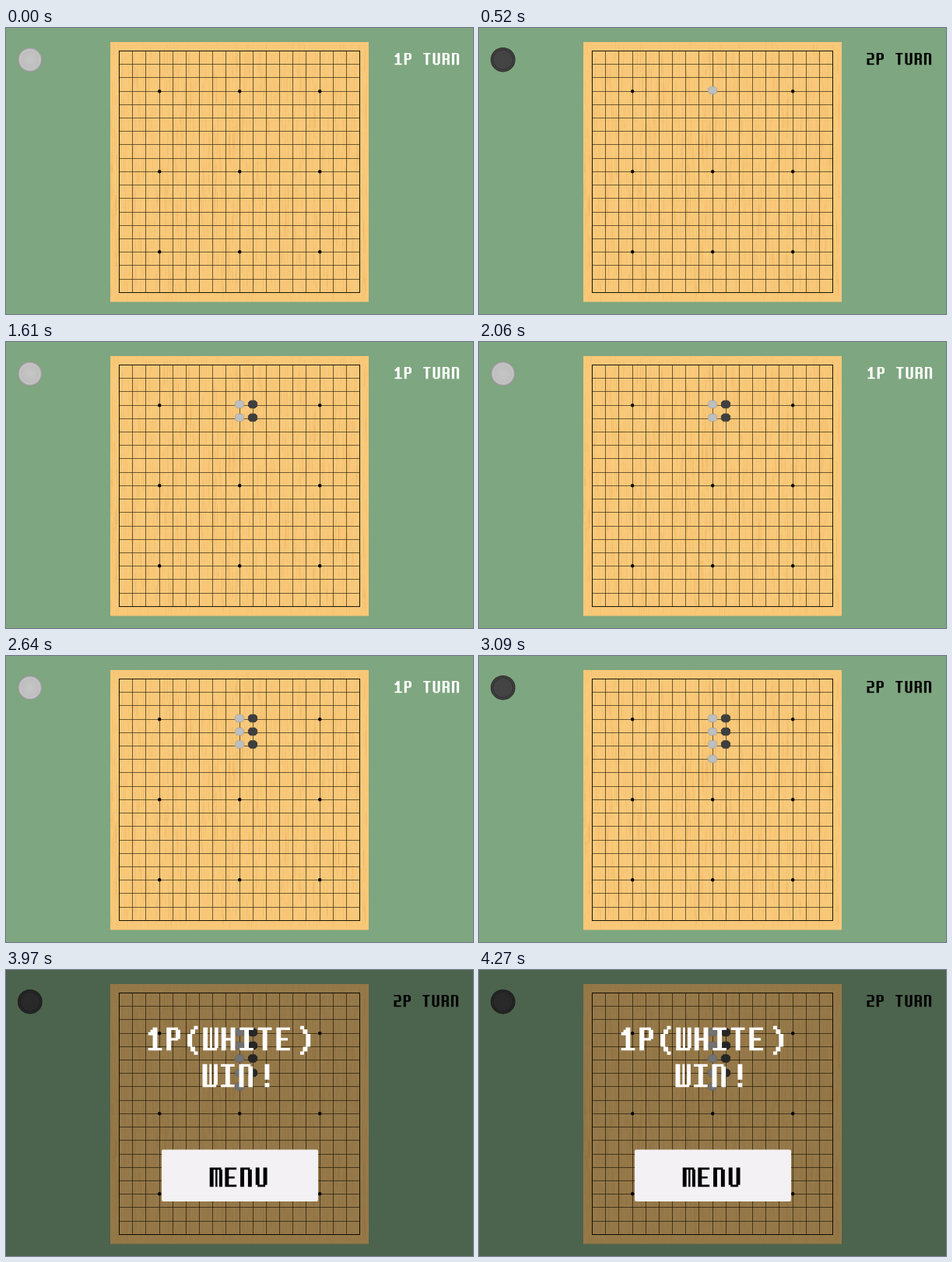
Recreate the animation shown at these times as an HTML page. Size 600x367 px, loop 4510 ms.

```html
<!DOCTYPE html>
<html lang="en">
<head>
<meta charset="utf-8">
<title>Five in a row</title>
<style>
  html, body { margin: 0; width: 100%; height: 100%; overflow: hidden; background: #7ea680; }
  svg { display: block; width: 100vw; height: 100vh; }
</style>
</head>
<body>
<svg id="stage" viewBox="0 0 600 367" xmlns="http://www.w3.org/2000/svg">
  <defs>
    <radialGradient id="pale">
      <stop offset="0" stop-color="#c6c6c6"/>
      <stop offset=".76" stop-color="#bebebe"/>
      <stop offset=".82" stop-color="#cacaca"/>
      <stop offset=".92" stop-color="#a6a6a6"/>
      <stop offset="1" stop-color="#8f8f8f"/>
    </radialGradient>
    <radialGradient id="dark">
      <stop offset="0" stop-color="#454545"/>
      <stop offset=".74" stop-color="#434343"/>
      <stop offset=".8" stop-color="#303030"/>
      <stop offset=".88" stop-color="#444"/>
      <stop offset="1" stop-color="#242424"/>
    </radialGradient>
  </defs>
  <rect width="600" height="367" fill="#7ea680"/>
  <g id="board"></g>
  <g id="stones"></g>
  <g id="turn1"></g>
  <g id="turn2"></g>
  <g id="result"></g>
</svg>
<script>
const LOOP = 4510, WIN = 3970;
const WHITE_AT = [420, 1210, 2090, 2880, WIN];
const BLACK_AT = [760, 1610, 2400, 3150];
const ROWS = [80, 97, 113.5, 132, 149.5];

const $ = id => document.getElementById(id);

function add(parent, tag, attrs) {
  const el = document.createElementNS("http://www.w3.org/2000/svg", tag);
  for (const k in attrs) el.setAttribute(k, attrs[k]);
  parent.appendChild(el);
  return el;
}

// Blocky lettering on an 8-unit cell: bars shared between letters
const BARS = {
  l: "M0 0h2v10h-2z", r: "M4 0h2v10h-2z", s: "M4 1h2v9h-2z",
  t: "M0 0h6v1.1h-6z", o: "M0 0h5v1.1h-5z",
  m: "M0 4.6h5v1.1h-5z", b: "M0 8.9h6v1.1h-6z", u: "M1 8.9h4v1.1h-4z",
  c: "M2 0h2v10h-2z", n: "M3 0h1v10h-1z",
  h: "M4 1h2v4h-2z", k: "M4 5.6h2v4.4h-2z", j: "M0 5.4h2v4h-2z",
  v: "M4 0h2v9h-2z", w: "M0 0h2v9h-2z",
  x: "M5 0h1.6v9h-1.6z", y: "M5 1h1.6v9h-1.6z",
  f: "M0 2h2v1.4h-2zM1 1h2v1.4h-2z",
  "(": "M4 -.7h1.7v1.5h-1.7zM2.5 .8h2v2h-2zM1.2 2.8h2v5.6h-2zM2.5 8.4h2v2h-2zM4 10.4h1.7v1.5h-1.7z",
  ")": "M2.4 -.7h1.7v1.5h-1.7zM3.6 .8h2v2h-2zM4.9 2.8h2v5.6h-2zM3.6 8.4h2v2h-2zM2.4 10.4h1.7v1.5h-1.7z",
  "!": "M3.2 0h2v6.8h-2zM3.2 8.2h2v1.8h-2z"
};
const LETTERS = {
  "1": "cbf", "2": "ohmjb", P: "lohm", T: "tc", U: "wvu", R: "lohmk", N: "los",
  W: "wnxb", H: "lrm", I: "tcb", E: "ltmb", M: "otlny",
  "(": "(", ")": ")", "!": "!", " ": ""
};

function write(parent, text, x, y, unit, fill) {
  const g = add(parent, "g", {
    transform: `translate(${x} ${y}) scale(${unit})`, fill, role: "img", "aria-label": text
  });
  [...text].forEach((ch, i) => {
    const d = [...LETTERS[ch]].map(b => BARS[b]).join("");
    if (d) add(g, "path", { d, transform: `translate(${i * 8} 0)` });
  });
}

function random(seed) {
  return () => (seed = (seed * 16807) % 2147483647) / 2147483647;
}

// Grid lines sit on whole pixels
const gridX = i => Math.floor(145.5 + i * 17.17) + .5;
const gridY = i => Math.floor(29.4 + i * 17.22) + .5;

function drawBoard() {
  const g = $("board"), rnd = random(77);
  add(g, "rect", { x: 134, y: 18, width: 332, height: 333.5, fill: "#f8c878" });
  for (const stroke of ["#dca050", "#ffd891"]) {
    let d = "";
    for (let i = 0; i < 1100; i++) {
      const len = 8 + rnd() * 32;
      d += `M${134.5 + Math.floor(rnd() * 332)} ${(18 + rnd() * (333 - len)).toFixed(1)}v${len.toFixed(1)}`;
    }
    add(g, "path", { d, stroke, "stroke-width": .8, "stroke-opacity": .2 });
  }
  const x0 = gridX(0), y0 = gridY(0), w = gridX(18) - x0, h = gridY(18) - y0;
  let lines = "";
  for (let i = 1; i < 18; i++) lines += `M${gridX(i)} ${y0}v${h}M${x0} ${gridY(i)}h${w}`;
  add(g, "path", { d: lines, stroke: "#2a220b", "stroke-opacity": .66 });
  add(g, "rect", { x: x0, y: y0, width: w, height: h, fill: "none", stroke: "#1c1606" });
  for (const i of [3, 9, 15]) for (const j of [3, 9, 15])
    add(g, "circle", { cx: gridX(i) - .3, cy: gridY(j) - .3, r: 2.2 });
}

function drawStones(x, times, fill, edge) {
  return times.map((at, i) => ({
    at,
    el: add($("stones"), "path", {
      d: `M${x - 3} ${ROWS[i] - 4.8}h6l2.6 2.4v4.8l-2.6 2.4h-6l-2.6 -2.4v-4.8z`,
      fill, stroke: edge, "stroke-width": .8, "stroke-linejoin": "round"
    })
  }));
}

function drawTurn(id, text, x, fill, ink) {
  add($(id), "circle", { cx: 30.8, cy: 40.7, r: 15.8, fill });
  write($(id), text, x, 32, 1.53, ink);
}

function drawResult() {
  const g = $("result");
  add(g, "rect", { width: 600, height: 367, fill: "#000", "fill-opacity": .4 });
  write(g, "1P(WHITE)", 182.7, 73.8, 2.94, "#fff");
  write(g, "WIN!", 252.5, 120.8, 2.94, "#fff");
  add(g, "rect", { x: 200, y: 230.5, width: 201, height: 66.5, rx: 2, fill: "#f3f1f4" });
  write(g, "MENU", 261.7, 253.6, 2.46, "#000");
}

drawBoard();
const whites = drawStones(300, WHITE_AT, "#bdbebe", "#aaa99f");
const blacks = drawStones(317, BLACK_AT, "#3f3f3f", "#353330");
drawTurn("turn1", "1P TURN", 499.5, "url(#pale)", "#fff");
drawTurn("turn2", "2P TURN", 498.5, "url(#dark)", "#000");
drawResult();

function show(el, on) {
  el.setAttribute("visibility", on ? "visible" : "hidden");
}

function render(t) {
  for (const s of [...whites, ...blacks]) show(s.el, t >= s.at);
  const played = list => list.filter(at => t >= at).length;
  const second = played(WHITE_AT) > played(BLACK_AT);
  show($("turn1"), !second);
  show($("turn2"), second);
  show($("result"), t >= WIN);
}

const start = performance.now();
function tick(now) {
  render(Math.max(0, now - start) % LOOP);
  requestAnimationFrame(tick);
}
render(0);
requestAnimationFrame(tick);
</script>
</body>
</html>
```
